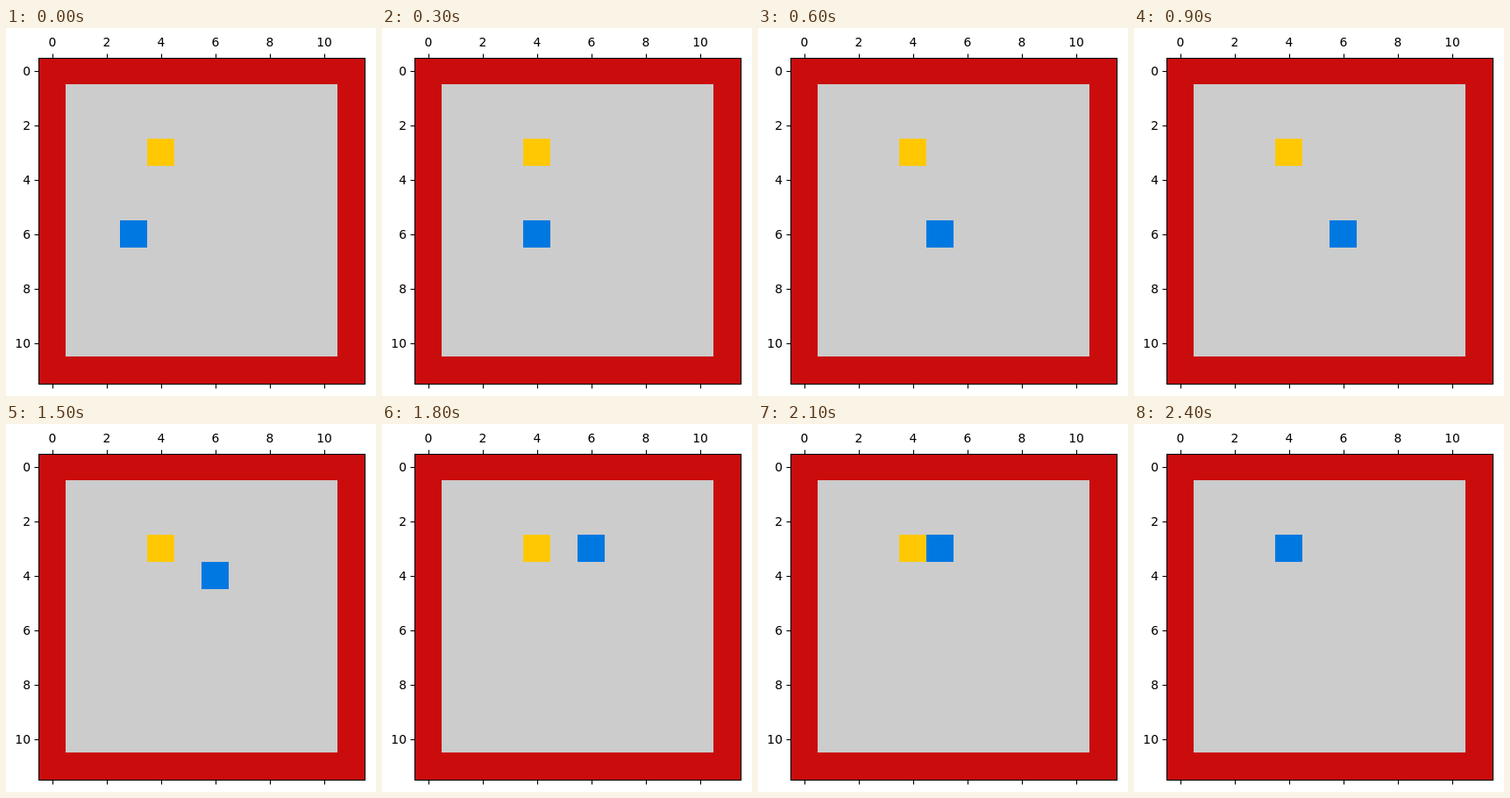
Animation, 422 px wide and 419 px high, one loop 2.7 s. Source, as an HTML page with a canvas:

```html
<!DOCTYPE html>
<html lang="en">
<head>
<meta charset="utf-8">
<title>Grid walk</title>
<style>
  html, body { margin: 0; width: 100%; height: 100%; overflow: hidden; background: #fff; }
  canvas { display: block; }
</style>
</head>
<body>
<canvas id="stage" width="422" height="419"></canvas>
<script>
const ctx = document.getElementById('stage').getContext('2d');
const CELL = 31, LEFT = 37, TOP = 33, SIZE = 12;
const STEP = 300;
const goal = [4, 3];
const path = [[3, 6], [4, 6], [5, 6], [6, 6], [6, 5], [6, 4], [6, 3], [5, 3], [4, 3]];

function block(col, row, span, color) {
  ctx.fillStyle = color;
  ctx.fillRect(LEFT + col * CELL, TOP + row * CELL, span * CELL, span * CELL);
}

function line(x1, y1, x2, y2) {
  ctx.beginPath();
  ctx.moveTo(x1, y1);
  ctx.lineTo(x2, y2);
  ctx.stroke();
}

function label(text, x, y, align) {
  ctx.textAlign = align;
  ctx.fillText(text, x, y);
}

function drawAxes() {
  ctx.strokeStyle = ctx.fillStyle = '#000';
  ctx.lineWidth = 1.1;
  ctx.strokeRect(37.5, 34.5, 372, 371);
  ctx.font = '13.89px "DejaVu Sans", sans-serif';
  for (let n = 0; n < SIZE; n += 2) {
    const x = 53.5 + n * CELL, y = 49.5 + n * CELL;
    line(x, 29.5, x, 34.5);
    line(x, 405.5, x, 410.5);
    line(32.5, y, 37.5, y);
    label(n, x - 0.5, 21, 'center');
    label(n, 28, y + 4.5, 'right');
  }
}

function draw(now) {
  const [col, row] = path[Math.floor(now / STEP) % path.length];
  ctx.fillStyle = '#fff';
  ctx.fillRect(0, 0, 422, 419);
  ctx.fillStyle = '#ca0c0d';
  ctx.fillRect(37, 34, 372, 371);
  block(1, 1, SIZE - 2, '#ccc');
  block(...goal, 1, '#ffc803');
  block(col, row, 1, '#0078e1');
  drawAxes();
}

const start = performance.now();
function tick() {
  draw(performance.now() - start);
  requestAnimationFrame(tick);
}
tick();
</script>
</body>
</html>
```
